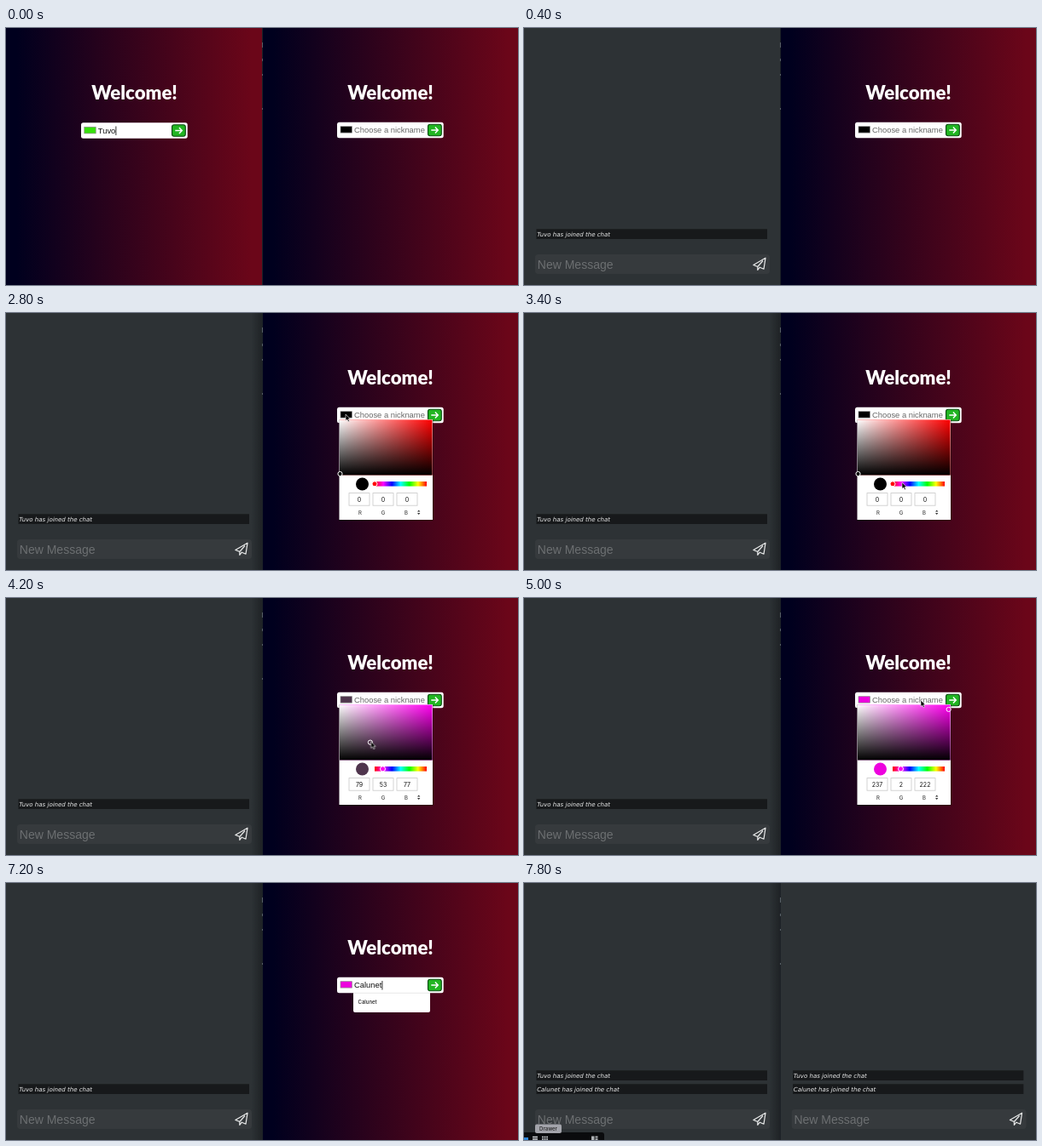
Animation of 600 by 302 pixels, one loop 8 s. Source, as an HTML page:

```html
<!DOCTYPE html>
<html lang="en">
<head>
<meta charset="utf-8">
<title>Chat join</title>
<style>
  html, body { margin: 0; width: 100%; height: 100%; overflow: hidden; background: #2d3235; }
  svg { display: block; width: 100vw; height: 100vh; }

  .title { font: 900 22.2px Lato, sans-serif; fill: #fff; text-anchor: middle; }
  .field { font: 9.4px "Liberation Sans", Arial, sans-serif; fill: #111; }
  .hint { fill: #686868; }
  .compose { font: 14px "Liberation Sans", Arial, sans-serif; fill: #6c6f71; }
  .notice { font: italic 7px "DejaVu Sans", sans-serif; fill: #eceded; }
  .small { font: 500 6px Inter, sans-serif; fill: #222; }
  .value { font: 7px Inter, sans-serif; fill: #111; text-anchor: middle; }
  .label { font: 6px Inter, sans-serif; fill: #222; text-anchor: middle; }

  .step { animation: 8s step-end infinite; }
  .left-form { animation-name: leave-left; }
  .right-form { animation-name: leave-right; }
  .second { animation-name: arrive; }
  .first { animation-name: lift; }
  .window-shadow { animation-name: activate; }
  .picker { animation-name: pick; }
  .suggestion { animation-name: suggest; }
  .dock { animation-name: dock; }
  .tooltip { animation-name: tooltip; }
  #pointer { animation: move 8s infinite, seen 8s step-end infinite; }

  @keyframes leave-left { 0% { opacity: 1 } 2.5%, 100% { opacity: 0 } }
  @keyframes leave-right { 0% { opacity: 1 } 92.5%, 100% { opacity: 0 } }
  @keyframes arrive { 0% { opacity: 0 } 92.5%, 100% { opacity: 1 } }
  @keyframes lift { 0% { transform: translateY(0) } 92.5%, 100% { transform: translateY(-16px) } }
  @keyframes activate { 0% { opacity: 0 } 12.5%, 100% { opacity: 1 } }
  @keyframes pick { 0% { opacity: 0 } 30% { opacity: 1 } 65%, 100% { opacity: 0 } }
  @keyframes suggest { 0% { opacity: 0 } 75% { opacity: 1 } 92.5%, 100% { opacity: 0 } }
  @keyframes dock {
    0% { transform: translateY(10px) }
    95% { transform: translateY(5px) }
    97.5%, 100% { transform: translateY(0) }
  }
  @keyframes tooltip { 0% { opacity: 0 } 97.5%, 100% { opacity: 1 } }
  @keyframes seen { 0% { opacity: 0 } 10% { opacity: 1 } 70%, 100% { opacity: 0 } }
  /* The pointer moves in 200 ms ticks. */
  @keyframes move {
    0% { transform: translate(520px, 200px); animation-timing-function: step-end }
    10% { transform: translate(520px, 200px); animation-timing-function: steps(6) }
    25% { transform: translate(387px, 120px); animation-timing-function: steps(1) }
    27.5% { transform: translate(398px, 119px); animation-timing-function: step-end }
    35% { transform: translate(398px, 119px); animation-timing-function: steps(3) }
    42.5% { transform: translate(443px, 199px); animation-timing-function: steps(1) }
    45% { transform: translate(434px, 200px); animation-timing-function: steps(1) }
    47.5% { transform: translate(441px, 200px); animation-timing-function: steps(1) }
    50% { transform: translate(393px, 188px); animation-timing-function: steps(3) }
    57.5% { transform: translate(497px, 130px); animation-timing-function: step-end }
    60% { transform: translate(497px, 130px); animation-timing-function: steps(1) }
    62.5% { transform: translate(465px, 120px); animation-timing-function: steps(1) }
    65%, 100% { transform: translate(440px, 120px); animation-timing-function: step-end }
  }
</style>
</head>
<body>
<svg viewBox="0 0 600 302" preserveAspectRatio="none">
  <defs>
    <linearGradient id="night">
      <stop offset=".04" stop-color="#00001e"/>
      <stop offset=".96" stop-color="#6b0619"/>
    </linearGradient>
    <linearGradient id="shade">
      <stop offset="0" stop-color="#14171a" stop-opacity="0"/>
      <stop offset="1" stop-color="#14171a" stop-opacity=".6"/>
    </linearGradient>
    <linearGradient id="whiten">
      <stop offset="0" stop-color="#fff"/>
      <stop offset="1" stop-color="#fff" stop-opacity="0"/>
    </linearGradient>
    <linearGradient id="darken" x2="0" y2="1">
      <stop offset="0" stop-opacity="0"/>
      <stop offset="1"/>
    </linearGradient>
    <linearGradient id="spectrum">
      <stop offset="0" stop-color="#f00"/>
      <stop offset=".167" stop-color="#f0f"/>
      <stop offset=".333" stop-color="#00f"/>
      <stop offset=".5" stop-color="#0ff"/>
      <stop offset=".667" stop-color="#0f0"/>
      <stop offset=".833" stop-color="#ff0"/>
      <stop offset="1" stop-color="#f00"/>
    </linearGradient>

    <rect id="backdrop" width="300" height="302" fill="url(#night)"/>

    <g id="form">
      <text class="title" x="150.5" y="84.3">Welcome!</text>
      <rect x="88" y="111.2" width="124.7" height="18.6" rx="2.5" fill="#fff"/>
      <rect x="194.5" y="113.8" width="15.8" height="13.4" rx="2.5" fill="#22b522" stroke="#0b4a12" stroke-width="1.1"/>
      <path d="M198.3 120.5h8m-3.4-3.4 3.4 3.4-3.4 3.4" fill="none" stroke="#fff" stroke-width="1.4"/>
    </g>

    <g id="chat">
      <rect width="300" height="302" fill="#2d3235"/>
      <rect x="13" y="266" width="275" height="23" rx="4" fill="#363a3d"/>
      <text class="compose" x="15.8" y="282.5">New Message</text>
      <path d="M268.8 278.4 283 270.2 281 283.2 276.3 281.2 273.8 284.4V280.5ZM273.8 280.5 280 273.5"
            fill="none" stroke="#e8e9e9" stroke-width="1.2" stroke-linejoin="round"/>
    </g>

    <g id="first-notice">
      <rect x="14.5" y="236.3" width="270.5" height="11.7" fill="#17191b"/>
      <text class="notice" x="15.2" y="244.8">Tuvo has joined the chat</text>
    </g>
    <g id="second-notice">
      <rect x="14.5" y="236.3" width="270.5" height="11.7" fill="#17191b"/>
      <text class="notice" x="15.2" y="244.8">Calunet has joined the chat</text>
    </g>
  </defs>

  <use href="#chat"/>
  <use href="#first-notice" class="step first"/>
  <use href="#second-notice" class="step second"/>
  <rect class="step window-shadow" x="288" width="13" height="302" fill="url(#shade)"/>
  <g class="step left-form">
    <use href="#backdrop"/>
    <use href="#form"/>
    <rect x="91.8" y="116.3" width="13.4" height="7.6" fill="#37e00d" stroke="#8a8a8a" stroke-width=".7"/>
    <text class="field" id="left-name" x="107.8" y="124">Tuvo</text>
    <rect id="left-caret" y="115.5" width=".8" height="10.5"/>
  </g>

  <use href="#chat" x="300.6"/>
  <use href="#first-notice" x="300.6" class="step first"/>
  <use href="#second-notice" x="300.6" class="step second"/>
  <g class="step right-form">
    <use href="#backdrop" x="300.6"/>
    <use href="#form" x="300" y="-.5"/>
    <rect class="paint" x="392" y="115.7" width="13.4" height="7.4" stroke="#8a8a8a" stroke-width=".7"/>
    <text class="field" id="right-name" x="408" y="123.4"></text>
    <rect id="right-caret" y="115" width=".8" height="10.5"/>

    <g class="step suggestion">
      <path d="M407 128.5h90v21.5q0 2-2 2h-86q-2 0-2-2z" fill="#fff"/>
      <path d="M407 129.3h90" stroke="#ddd" stroke-width=".7"/>
      <text class="small" x="412.5" y="142.2">Calunet</text>
    </g>

    <g class="step picker">
      <rect x="389.8" y="125" width="111" height="119.3" rx="1" opacity=".3"/>
      <rect x="390.5" y="125" width="109.5" height="118" fill="#fff"/>
      <rect id="tone" x="391" y="125.5" width="108.5" height="65"/>
      <rect x="391" y="125.5" width="108.5" height="65" fill="url(#whiten)"/>
      <rect x="391" y="125.5" width="108.5" height="65" fill="url(#darken)"/>
      <circle id="tone-thumb" class="paint" r="2.6" stroke="#fff"/>
      <circle class="paint" cx="417.5" cy="201" r="7.5"/>
      <rect x="432" y="198" width="61" height="5.6" fill="url(#spectrum)"/>
      <circle id="hue-thumb" cy="200.8" r="3" stroke="#fff"/>
      <g fill="#fff" stroke="#c8c8c8" stroke-width=".8">
        <rect x="402" y="211.6" width="24" height="14.6"/>
        <rect x="430" y="211.6" width="24" height="14.6"/>
        <rect x="458" y="211.6" width="24" height="14.6"/>
      </g>
      <text class="value" x="414" y="221.5"></text>
      <text class="value" x="442" y="221.5"></text>
      <text class="value" x="470" y="221.5"></text>
      <text class="label" x="415" y="236.5">R</text>
      <text class="label" x="442" y="236.5">G</text>
      <text class="label" x="469" y="236.5">B</text>
      <path d="M482 233.6 483.7 231.6 485.4 233.6ZM482 235 483.7 237 485.4 235Z" fill="#333"/>
    </g>
  </g>

  <rect x="300" width="1" height="302" fill="#1d2227"/>
  <path d="M300.5 17v6m0 13v3m0 15v2m0 38v2" stroke="#687078" stroke-width=".8"/>

  <g class="step dock">
    <path d="M0 293h91q3 0 3 3v6H0z" fill="#0a0b0d"/>
    <rect y="299" width="5" height="3" fill="#2f86d8"/>
    <path d="M10 298.5h6m-6 2.5h6M21 298.5h7m-7 2.5h7" stroke="#d4d7da" stroke-width="1.5"/>
    <path d="M23.2 297v5m2.6-5v5" stroke="#0a0b0d" stroke-width=".7"/>
    <path d="M79 297.5h3.5v4.5H79zm4.5 0h3v2h-3zm0 2.8h3v1.7h-3z" fill="#aeb2b5"/>
  </g>
  <g class="step tooltip">
    <rect x="13" y="283.5" width="31" height="10.5" rx="2" fill="#a3a4ab"/>
    <text class="small" x="28.5" y="291" text-anchor="middle">Drawer</text>
  </g>

  <path id="pointer" d="M0 0V7.6L1.8 6.1 3 8.8 4.4 8.2 3.2 5.6H5.4Z" stroke="#fff" stroke-width=".6"/>
</svg>

<script>
  const byId = id => document.getElementById(id);
  const all = selector => document.querySelectorAll(selector);
  const setAttrs = (el, attrs) => Object.entries(attrs).forEach(([k, v]) => el.setAttribute(k, v));
  const progress = (t, from, to) => Math.min(1, Math.max(0, (t - from) / (to - from)));

  const LOOP = 8000;
  const TICK = 200;
  const NAME = 'Calunet';
  const leftName = byId('left-name');
  const rightName = byId('right-name');

  function toRgb(h, s, v) {
    const channel = n => {
      const k = (n + h / 60) % 6;
      return Math.round(255 * v * (1 - s * Math.max(0, Math.min(k, 4 - k, 1))));
    };
    return [channel(5), channel(3), channel(1)];
  }

  function drawPicker(t) {
    const hue = 360 - 56.2 * progress(t, 3600, 3800);
    const drag = progress(t, 4000, 4600);
    const saturation = 0.992 * drag;
    const value = 0.93 * drag;
    const rgb = toRgb(hue, saturation, value);
    const pure = `rgb(${toRgb(hue, 1, 1)})`;

    all('.paint').forEach(el => el.setAttribute('fill', `rgb(${rgb})`));
    all('.value').forEach((el, i) => { el.textContent = rgb[i]; });
    byId('tone').setAttribute('fill', pure);
    setAttrs(byId('tone-thumb'), { cx: 391.5 + 107 * saturation, cy: 189 - 62.5 * value });
    setAttrs(byId('hue-thumb'), { cx: 432 + 61 * (360 - hue) / 360, fill: pure });
  }

  function drawName(t) {
    const typed = NAME.slice(0, Math.max(0, (t - 5800) / TICK));
    rightName.textContent = typed || 'Choose a nickname';
    rightName.classList.toggle('hint', !typed);
    const width = typed ? rightName.getComputedTextLength() : 0;
    setAttrs(byId('right-caret'), { x: 408.2 + width, opacity: t >= 5200 ? 1 : 0 });
    byId('left-caret').setAttribute('x', 108 + leftName.getComputedTextLength());
  }

  function frame() {
    // A small lead keeps the ticks in step with the keyframes despite clock rounding.
    const t = Math.floor(performance.now() / TICK + 0.05) * TICK % LOOP;
    drawPicker(t);
    drawName(t);
    requestAnimationFrame(frame);
  }
  frame();
</script>
</body>
</html>
```
